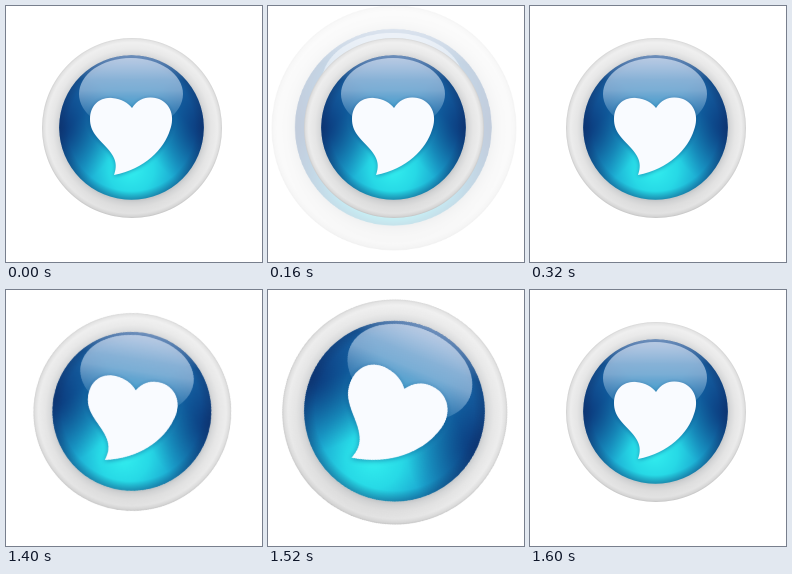
Write an HTML page with a canvas that moves like this. It is 256x256 px and loops after 1640 ms.

```html
<!DOCTYPE html>
<html>
<head>
<meta charset="utf-8">
<style>
html, body { margin: 0; width: 100%; height: 100%; overflow: hidden; background: #fff; }
canvas { display: block; width: 256px; height: 256px; }
</style>
</head>
<body>
<canvas id="stage" width="256" height="256"></canvas>
<script>
const stage = document.getElementById('stage').getContext('2d');
const LOOP = 1640, STEP = 40, CX = 126, CY = 122;
const HALF = 96, DETAIL = 2;

// The button is painted once, so a faded copy blends as a single layer.
const button = document.createElement('canvas');
button.width = button.height = HALF * 2 * DETAIL;
const ctx = button.getContext('2d');
ctx.scale(DETAIL, DETAIL);
ctx.translate(HALF, HALF);

function disc(x, y, r, fill) {
  ctx.beginPath();
  ctx.arc(x, y, r, 0, Math.PI * 2);
  ctx.fillStyle = fill;
  ctx.fill();
}

function withStops(gradient, stops) {
  for (const [at, color] of stops) gradient.addColorStop(at, color);
  return gradient;
}

function radial(x, y, r, stops) {
  return withStops(ctx.createRadialGradient(x, y, 0, x, y, r), stops);
}

function vertical(top, bottom, stops) {
  return withStops(ctx.createLinearGradient(0, top, 0, bottom), stops);
}

function paintRing() {
  disc(0, 0, 90, radial(0, 0, 90, [
    [0.79, '#c6c8ca'], [0.83, '#d9dadb'], [0.88, '#e6e6e6'],
    [0.95, '#ededed'], [0.985, '#dfdfdf'], [1, '#cbcbcb']
  ]));
  disc(0, 0, 90, vertical(-90, 90, [
    [0, 'rgba(255,255,255,.2)'], [0.5, 'rgba(235,235,235,0)'], [1, 'rgba(0,0,0,.05)']
  ]));
}

function paintBall() {
  const ball = fill => disc(-0.5, -0.5, 72.3, fill);
  ball(radial(-1, 42, 114, [
    [0, '#32eeef'], [0.2, '#27d9e6'], [0.4, '#1ba6d0'],
    [0.65, '#1475b3'], [1, '#1c5c9f']
  ]));
  for (const side of [-1, 1]) {
    ball(radial(side * 77, 0, 62, [
      [0, 'rgba(8,32,98,.8)'], [0.4, 'rgba(8,38,108,.48)'], [1, 'rgba(8,50,120,0)']
    ]));
  }
  ball(radial(-0.5, -0.5, 72.3, [
    [0.88, 'rgba(16,52,105,0)'], [1, 'rgba(16,52,105,.4)']
  ]));
  ball(vertical(-73, -48, [
    [0, 'rgba(170,188,220,.6)'], [1, 'rgba(170,188,220,0)']
  ]));
}

function paintGloss() {
  ctx.beginPath();
  ctx.ellipse(-1, -34, 52, 36, 0, 0, Math.PI * 2);
  ctx.fillStyle = vertical(-70, 2, [
    [0, 'rgba(215,226,243,.72)'], [0.45, 'rgba(195,218,240,.58)'], [1, 'rgba(130,195,232,.03)']
  ]);
  ctx.fill();
}

function paintHeart() {
  ctx.beginPath();
  ctx.moveTo(0, -20);
  ctx.bezierCurveTo(7, -31, 18, -32, 27, -29);
  ctx.bezierCurveTo(39, -24, 43, -11, 38, 2);
  ctx.bezierCurveTo(32, 21, 13, 41, -18, 47);
  ctx.bezierCurveTo(-14, 36, -17, 29, -25, 20);
  ctx.bezierCurveTo(-34, 10, -42, 4, -42, -9);
  ctx.bezierCurveTo(-42, -23, -32, -31, -20, -30);
  ctx.bezierCurveTo(-10, -29, -4, -25, 0, -20);
  ctx.closePath();
  ctx.shadowColor = 'rgba(10,70,130,.5)';
  ctx.shadowBlur = 4 * DETAIL;
  ctx.shadowOffsetY = DETAIL;
  ctx.fillStyle = '#f9fbff';
  ctx.fill();
}

function place(scale, degrees, alpha, shift) {
  stage.save();
  stage.translate(CX + shift, CY);
  stage.rotate(degrees * Math.PI / 180);
  stage.scale(scale, scale);
  stage.globalAlpha = alpha;
  stage.drawImage(button, -HALF, -HALF, HALF * 2, HALF * 2);
  stage.restore();
}

// A copy behind the button that spreads and fades over eight steps.
function echo(age) {
  if (age < 1 || age >= 8) return;
  place(1 + 0.118 * age - 0.007 * age * age, 0, (1 - age / 8) ** 2, 0);
}

function swell(time) {
  if (time < 1400 || time >= 1600) return 0;
  if (time >= 1560) return 0.55;
  return 1 - ((1520 - time) / 160) ** 1.75;
}

function draw() {
  const step = Math.floor(performance.now() % LOOP / STEP);
  const amount = swell(step * STEP);
  stage.fillStyle = '#fff';
  stage.fillRect(0, 0, 256, 256);
  echo(step);
  place(1 + 0.25 * amount, 22.5 * amount, 1, 0.8 * amount);
  requestAnimationFrame(draw);
}

stage.imageSmoothingQuality = 'high';
paintRing();
paintBall();
paintGloss();
paintHeart();
draw();
</script>
</body>
</html>
```
